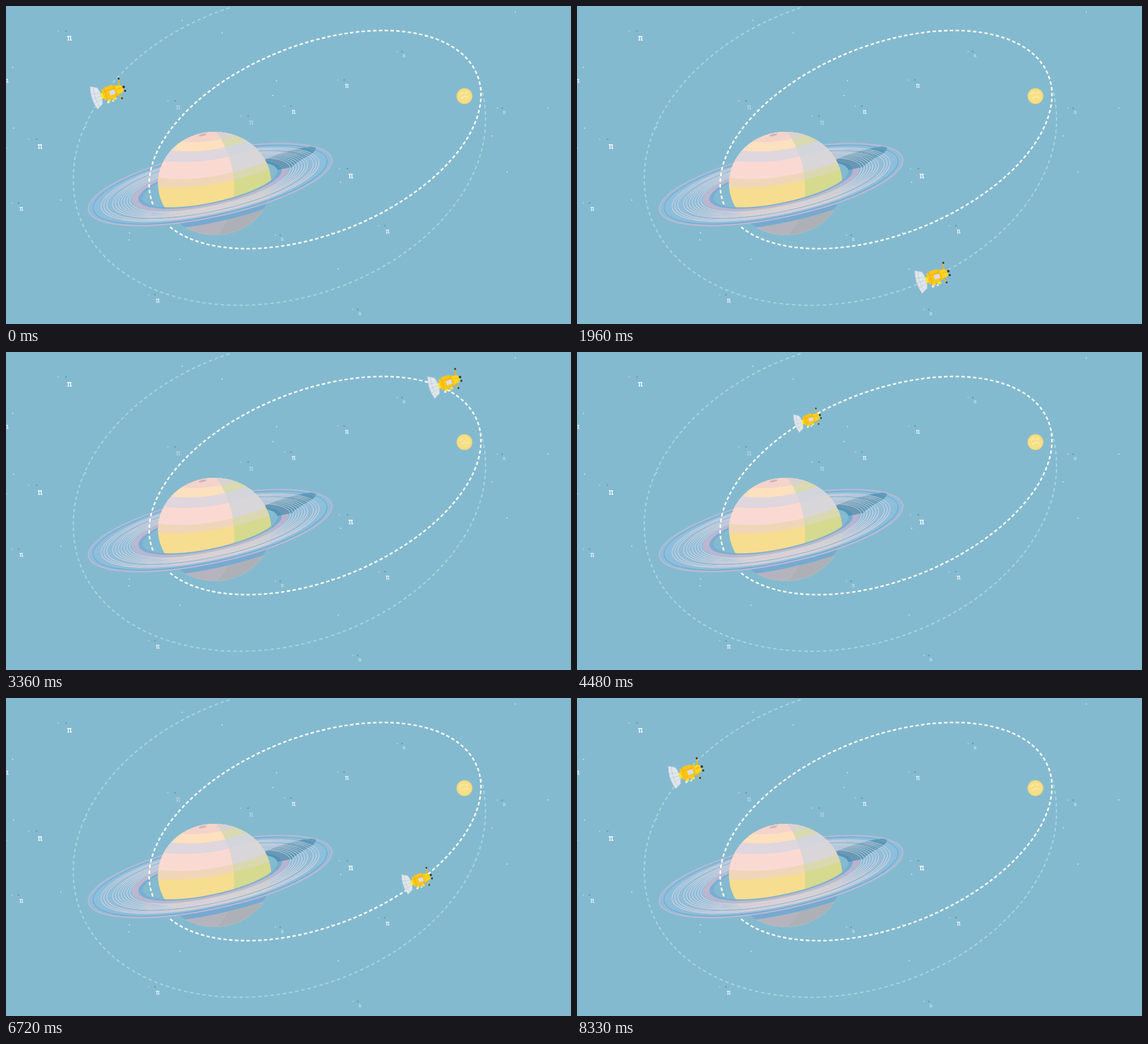
An HTML page for the animation above (8.4 s loop, 998 by 561 pixels).

```html
<!DOCTYPE html>
<html lang="en">
<head>
<meta charset="utf-8">
<title>Ringed planet tour</title>
<style>
  html, body { margin: 0; width: 100%; height: 100%; overflow: hidden; background: #84bad0; }
  svg { display: block; width: 100vw; height: 100vh; }
</style>
</head>
<body>
<svg viewBox="0 0 998 561" fill="none">
  <defs>
    <clipPath id="globe"><ellipse cx="368.5" cy="313" rx="100" ry="91"/></clipPath>
    <clipPath id="night"><path d="M372 222Q405 270 403 330Q400 375 372 404H480V215Z"/></clipPath>
    <clipPath id="back"><path d="M-240-70H240V0H-240Z"/></clipPath>
    <clipPath id="front"><path d="M-240 0H240V70H-240Z"/></clipPath>
    <clipPath id="disc"><path id="discShape" clip-rule="evenodd"/></clipPath>
    <path id="star" d="M-4-3.2H3.5M-2-3L-1.5 3M1.8-3L2.3 3M-3.2 3.2H-.3M1 3.2H4.2" stroke-width="1.5"/>
    <g id="fill"></g>
    <g id="lines"></g>
    <g id="probe" transform="rotate(-18)">
      <path d="M-26-21Q-33 0-26 21L-15 15Q-12 8-12 0Q-12-8-15-15Z" fill="#dfe6ec" stroke="#c3ced6" stroke-width=".7"/>
      <path d="M-21-18Q-26 0-21 18M-29-8L-13-5M-29.500 1H-12M-28.500 10L-13 6"
            stroke="#b3c0c9" stroke-width=".7" stroke-dasharray="4 1"/>
      <path d="M-13-4H-7V6H-13Z" fill="#ffe81c"/>
      <path d="M23-6L26-19M18 7L21 16" stroke="#f3b516" stroke-width="2.200"/>
      <path d="M15-8H24L28-4V4L24 7H15Z" fill="#ffd51d"/>
      <path d="M-9-10H-3V-12H12V-10H17V9H12V12H-4V10H-9Z" fill="#fcc51b"/>
      <path d="M-4-11V11M13-10V9M-4-5H13M18-2H27" stroke="#e8a50f" stroke-width=".8"/>
      <path d="M3-3H13V5H3Z" fill="#d8dde4"/>
      <path d="M-5 11H1V15H-5ZM6 11H12V15H6Z" fill="#ffe03a"/>
      <path d="M-6 14H-2V17H-6ZM3 14H6V17H3Z" fill="#eef2f4"/>
      <path d="M24.500-20.500H27.500V-17H24.500ZM28-4H32V0H28ZM28.500 3.500H32V7H28.500ZM19.500 14.500H22.500V17.500H19.500Z" fill="#3d3a38"/>
    </g>
  </defs>
  <rect width="998" height="561" fill="#84bad0"/>
  <g id="sky"></g>
  <g transform="translate(360.5 315) rotate(-12.07)">
    <use href="#fill" clip-path="url(#back)"/>
    <g clip-path="url(#disc)">
      <path transform="rotate(12.07) translate(-360.5 -315)" opacity=".65"
            d="M455 272Q500 252 545 247Q552 251 540 261Q522 270 508 281Q500 292 488 303H465Z" fill="#3f87a8"/>
    </g>
    <use href="#lines" clip-path="url(#back)" opacity=".75"/>
  </g>
  <g clip-path="url(#globe)">
    <g id="day"></g>
    <g id="dark" clip-path="url(#night)"></g>
    <ellipse cx="347" cy="227.500" rx="7" ry="2" transform="rotate(-12 347 227)" fill="#d5b3b8"/>
    <g transform="translate(361 324) rotate(-12.07)" clip-path="url(#front)">
      <ellipse rx="201" ry="52" stroke="#76aad1" stroke-width="12"/>
    </g>
  </g>
  <path d="M395 3A372 262-16.900 0 0 119 310A372 262-16.900 0 0 412 528A372 262-16.900 0 0 847 200C847 175 843 155 838 140"
        stroke="#a6d6dc" stroke-width="2.300" stroke-dasharray="6 5"/>
  <path d="M290 390A308.300 166.900-21.700 1 0 260 351" stroke="#fffdf2" stroke-width="2.700" stroke-dasharray="6 4.200"/>
  <circle cx="809.800" cy="159" r="14" fill="#f1d77c"/>
  <circle cx="809.800" cy="159" r="12" fill="#f6e086"/>
  <path d="M801 156L808 152M804 163L811 159L817 161M811 154L816 152" stroke="#faecb0" stroke-width="1.500"/>
  <use class="craft" href="#probe"/>
  <use class="craft" href="#probe"/>
  <g transform="translate(360.5 315) rotate(-12.07)" opacity=".93">
    <use href="#fill" clip-path="url(#front)"/>
    <use href="#lines" clip-path="url(#front)"/>
  </g>
</svg>
<script>
const $ = id => document.getElementById(id);

// Rings: concentric ellipses, k = 1 is the rim
const oval = k => {
  const a = 221 * k, b = 57.8 * k;
  return `M${-a} 0a${a} ${b} 0 1 0 ${2 * a} 0a${a} ${b} 0 1 0 ${-2 * a} 0Z`;
};
const band = (from, to, fill) => `<path d="${oval(from)}${oval(to)}" fill="${fill}" fill-rule="evenodd"/>`;
const line = (k, stroke, width) => `<path d="${oval(k)}" stroke="${stroke}" stroke-width="${width}"/>`;
$('fill').innerHTML = band(1, .55, '#8ebfdc') + band(.64, .585, '#bfb6d0') + band(.585, .55, '#79aed3');
let lines = line(.993, '#c6b8d2', 2.2) + line(.955, '#6fa7ce', 1.4);
for (let k = .89; k > .64; k -= .0235) lines += line(k, '#e8d6db', 1.15);
$('lines').innerHTML = lines + line(.82, '#72a9cf', .8);
$('discShape').setAttribute('d', oval(1) + oval(.55));

// Planet: each band fills everything above its lower edge
const edges = [319, 302, 270, 249, 230].map((y, i) => `M260 ${y}Q365 ${y + 8 + 6 * i} 480 ${y - 36}V200H260Z`);
const paint = (base, tones, south) =>
  `<path d="M260 210H480V410H260Z" fill="${base}"/>`
  + edges.map((d, i) => `<path d="${d}" fill="${tones[i]}"/>`).join('')
  + `<path d="M260 370Q380 372 475 335V420H260Z" fill="${south}"/>`;
$('day').innerHTML = paint('#f6dd90', ['#f0d6b9', '#fad9d3', '#dfd6de', '#fde0be', '#f4d3cb'], '#b5b4be');
$('dark').innerHTML = paint('#d5da8e', ['#d9d8b0', '#d9d6d9', '#d3d5dc', '#d9d9b2', '#d8d2d2'], '#adb1b7');

// Sky: a few stars, each with a pale and a dark companion, among random specks
const dot = (x, y, fill, r) => `<circle cx="${x}" cy="${y}" r="${r}" fill="${fill}"/>`;
const stars = (list, size, alpha) => list.split(' ').map(p => {
  const [x, y] = p.split(',').map(Number);
  return dot(x - 20 * size, y - 13 * size, '#a9d3df', 1.2) + dot(x - 6 * size, y - 13 * size, '#5e9dba', 1.5)
    + `<use href="#star" transform="translate(${x} ${y}) scale(${size})" stroke="#fff" opacity="${alpha}"/>`;
}).join('');
let seed = 11;
const random = () => (seed = seed * 16807 % 2147483647) / 2147483647;
let sky = stars('112,57 60,248 609,300', 1, 1)
  + stars('27,358 602,141 508,187 674,398 268,520 1,132', .8, .9)
  + stars('433,206 304,179', .9, .4)
  + stars('703,88 488,412 625,543 880,188', .6, .6);
for (let i = 0; i < 20; i++) sky += dot(random() * 998, random() * 561, '#e0f0f4', 1);
$('sky').innerHTML = sky;

// Flight: arcs at even speed between key poses (time, x, y, size)
const OUTER = '372 262 -16.9', INNER = '308.3 166.9 -21.7';
const poses = [
  [-840, 408, -33, 1], [0, 180, 154, 1], [630, 144, 385, 1], [1960, 628, 479, 1], [2940, 857, 188, 1],
  [3360, 775, 55, .97], [4480, 407, 120, .79], [5460, 297, 383, .76], [6720, 726, 322, .87],
  [7280, 843, 163, .97], [8260, 566, 54, .87]
];
const legs = poses.slice(1).map((to, i) => {
  const from = poses[i], path = document.createElementNS('http://www.w3.org/2000/svg', 'path');
  path.setAttribute('d', `M${from[1]} ${from[2]}A${to[0] < 3000 ? OUTER : INNER} 0 0 ${to[1]} ${to[2]}`);
  return { from, to, path, length: path.getTotalLength() };
});

const LOOP = 8400, STEP = 70;
const crafts = document.querySelectorAll('.craft');
function draw() {
  const now = Math.floor(performance.now() % LOOP / STEP) * STEP;
  // The next visit enters before the last one is over
  crafts.forEach((craft, n) => {
    const t = now - n * LOOP;
    const leg = legs.find(({ from, to }) => t >= from[0] && t < to[0]);
    craft.setAttribute('visibility', leg ? 'visible' : 'hidden');
    if (!leg) return;
    const { from, to, path, length } = leg;
    const u = (t - from[0]) / (to[0] - from[0]);
    const { x, y } = path.getPointAtLength(length * u);
    craft.setAttribute('transform', `translate(${x} ${y}) scale(${from[3] + (to[3] - from[3]) * u})`);
  });
  requestAnimationFrame(draw);
}
draw();
</script>
</body>
</html>
```
